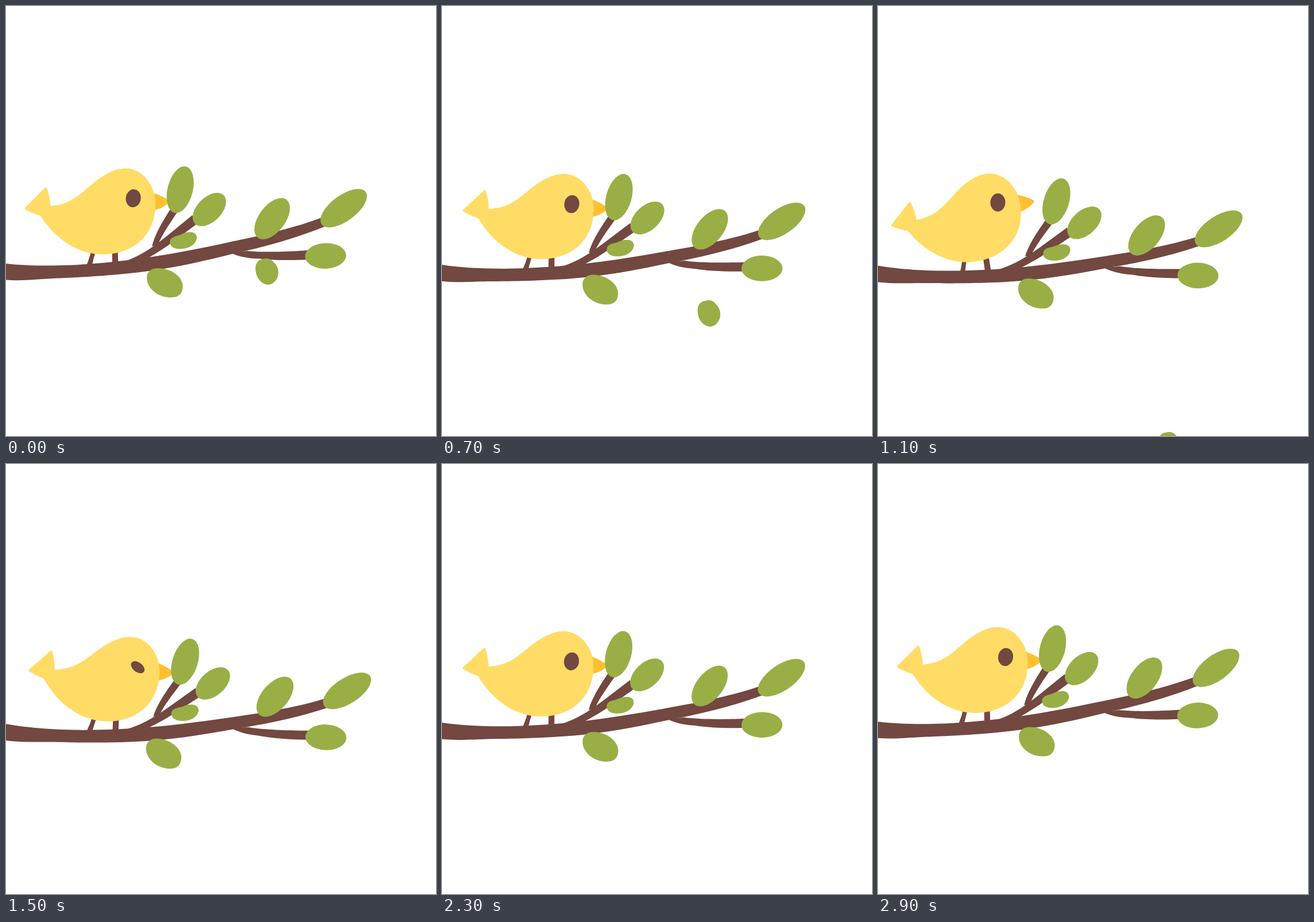
An HTML page that plays this animation: 748 px wide and 748 px high, repeating every 3000 ms.

```html
<!DOCTYPE html>
<html lang="en">
<head>
<meta charset="utf-8">
<title>Bird on a branch</title>
<style>
  html, body { margin: 0; width: 100%; height: 100%; overflow: hidden; background: #fff; }
  svg { display: block; width: 100vw; height: 100vh; }
  .wood { fill: #724840; }
  .leaf { fill: #9aae46; }
  .body { fill: #ffdc66; }
  .beak { fill: #ffbf2f; }
</style>
</head>
<body>
<svg viewBox="0 0 748 748">
  <g id="branch">
    <g id="bird">
      <path class="wood" d="M148 426H156.500Q152 438 149 456H138Q145 440 148 426ZM184.500 426H194.500L195.500 455H185Z"/>
      <path class="beak" d="M254 324L259 326Q275 332 283 338Q286 340 282 343Q272 352 259 355L254 355Z"/>
      <path class="body" d="M33 351L68 316Q70 314 71 317Q77 333 77.500 348C113 345 128 328 146 313C165 296 188 282 208 282.500C238 283 260 312 260 345C260 398 222 432 168 432C125 432 85 405 60 365Q46 361 34 354Q31 353 33 351Z"/>
      <g id="eye"><ellipse class="wood" rx="13" ry="15.700" transform="rotate(8)"/></g>
    </g>
    <g class="wood">
      <path d="M-90 440L0 448C45 453.500 110 452 150 448.300C260 440 350 419 439 400C475 391 510 383 552 367L556 383C500 406 440 421 395 431C330 447 280 459 200 466.500C140 472 100 473 80 474C50 475.500 30 478.500 0 476.500L-90 474Z"/>
      <path d="M206 444.500C235 434 255 420 280 400L324 364L332 379L300 403C278 420 262 430 244 440Z"/>
      <path d="M254 418C258 400 270 378 288 350L299 357C285 378 272 397 264 416Z"/>
      <path d="M392 430L420 426C440 428.500 480 428 526 425V441C490 443 460 442 440 439.500C420 439 405 436 392 430Z"/>
    </g>
    <g class="leaf">
      <ellipse rx="22" ry="41.500" transform="translate(303 319.500) rotate(14)"/>
      <ellipse rx="21.200" ry="35.200" transform="translate(353.700 354) rotate(45)"/>
      <path d="M285 411C285 402 294 401 303 398C312 393 330 389 332 402C332 412 322 420 310 422C298 424 286 422 285 411Z"/>
      <path d="M245 473C245 462 253 456 264 456C288 456 308 472 307.500 488C307 502 299 507 286 507C264 507 245 491 245 473Z"/>
      <ellipse rx="23" ry="41.500" transform="translate(463 370) rotate(37)"/>
      <ellipse rx="47.600" ry="22.200" transform="translate(587.500 351.700) rotate(-36.500)"/>
      <ellipse rx="35.700" ry="22.300" transform="translate(556 434.700) rotate(-2)"/>
    </g>
  </g>
  <path id="loose" class="leaf" d="M434 456C434 446 440 441 447 440C456 437 462 441 466 446C473 452 475 462 473 470C469 481 461 486 453 484.500C440 481 434 469 434 456Z"/>
</svg>
<script>
  const LOOP = 3000, STEP = 100, DROP = 600;
  const set = (id, transform) => document.getElementById(id).setAttribute('transform', transform);
  const smooth = (from, to, t) => {
    const x = Math.min(1, Math.max(0, (t - from) / (to - from)));
    return x * x * (3 - 2 * x);
  };

  // The branch sinks by 4 degrees until 1400 ms, then rises again.
  const sag = t => 4 * (t < 1400 ? t / 1400 : (LOOP - t) / 1600);
  const sway = t => `rotate(${sag(t)} -66 462)`;

  function draw() {
    const t = Math.floor(performance.now() % LOOP / STEP) * STEP;
    const lean = -10 * (smooth(700, 900, t) - smooth(1100, 1350, t));
    const open = 1 - 0.45 * Math.max(0, 1 - Math.abs(t - 1500) / 150);
    const fall = Math.max(0, t - DROP);

    set('branch', sway(t));
    set('bird', `rotate(${lean} 168 445)`);
    set('eye', `translate(221.5 334.5) rotate(26) scale(1 ${open}) rotate(-26)`);
    set('loose', `translate(${fall * 0.107} ${fall * 0.573}) ${sway(Math.min(t, DROP))}`);
    requestAnimationFrame(draw);
  }
  draw();
</script>
</body>
</html>
```
